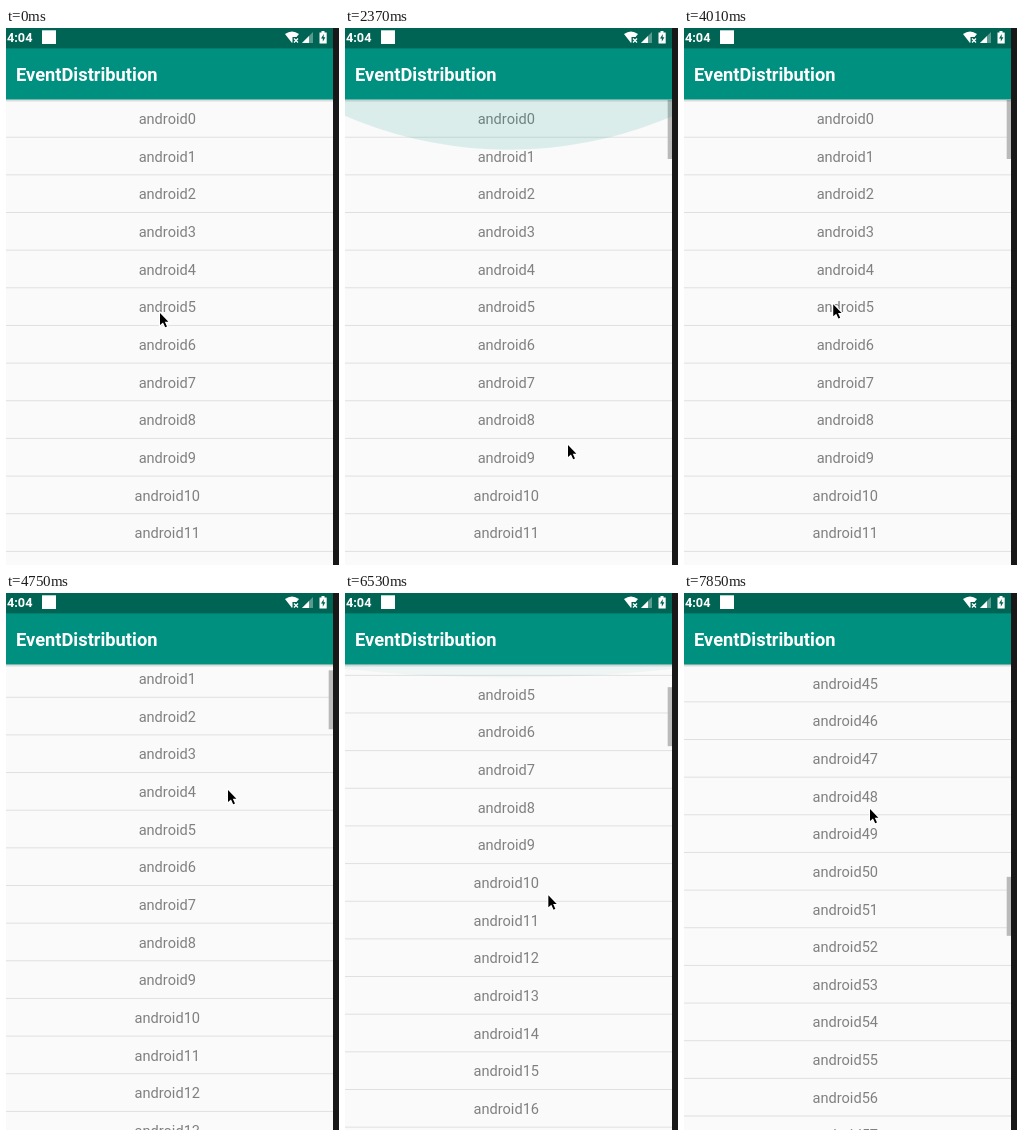
Animation, 333 px wide and 537 px high, one loop 7.99 s. Source, as an HTML page:

```html
<!DOCTYPE html>
<html lang="en">
<head>
<meta charset="utf-8">
<title>EventDistribution</title>
<style>
  html, body { margin: 0; width: 100%; height: 100%; overflow: hidden; background: #fafafa; }
  svg { display: block; width: 333px; height: 537px; font-family: Roboto, sans-serif; }
  .bar-text { fill: #fff; font-weight: 600; }
  #rows text { font-size: 14.6px; fill: #808080; text-anchor: middle; }
  #rows rect { fill: #e0e0e0; }
</style>
</head>
<body>
<svg viewBox="0 0 333 537">
  <defs>
    <clipPath id="view"><rect y="71" width="327" height="466"/></clipPath>
    <linearGradient id="shade" x2="0" y2="1">
      <stop stop-opacity=".18"/>
      <stop offset="1" stop-opacity="0"/>
    </linearGradient>
  </defs>
  <rect width="333" height="537" fill="#fafafa"/>
  <g clip-path="url(#view)">
    <g id="rows"></g>
    <rect id="thumb" x="322.7" width="4.3" height="59" fill="#bababa"/>
    <ellipse id="glow" cx="164" fill="#009080"/>
    <rect y="71.5" width="327" height="3" fill="url(#shade)"/>
  </g>

  <rect width="327" height="71.5" fill="#009080"/>
  <rect width="327" height="20.4" fill="#006454"/>
  <text class="bar-text" x="1" y="14.2" font-size="12.7">4:04</text>
  <text class="bar-text" x="10" y="53" font-size="18.3">EventDistribution</text>
  <g fill="#fff">
    <rect x="36" y="2.3" width="14" height="13.7"/>
    <path d="M279 6Q286 .8 293 6L290.5 9H286.5V14.2L286 15Z"/>
    <path d="M288 10.5L292 14.5M292 10.5L288 14.5" stroke="#fff" stroke-width="1.3"/>
    <path d="M296 15L307 4V15Z" opacity=".35"/>
    <path d="M296 15L303 8V15Z"/>
    <path d="M313.5 4.5H315.5V3H318.5V4.5H320.7V15.5H313.5Z"/>
  </g>
  <path d="M317.8 6L315 10.5H316.8V13.8L319.4 9.2H317.6Z" fill="#006454"/>
  <rect x="327" width="6" height="537" fill="#181818"/>
  <g id="cursor">
    <path d="M1 2V14L4 11.5L6.2 16.3L8 15.5L5.8 10.7H9.4Z"
      stroke="#fff" stroke-width="2" paint-order="stroke"/>
  </g>
</svg>
<script>
  const LOOP = 7990, TICK = 148.1, ROW = 37.65, ROW_COUNT = 100, TOP = 72, WIDTH = 327;
  const byId = id => document.getElementById(id);
  const [rows, glow, thumb, cursor] = ['rows', 'glow', 'thumb', 'cursor'].map(byId);

  // Where the pointer turns: tick, x, y
  const turns = [[0, 153, 283], [7, 150, 411], [11, 223, 322], [16, 222, 415], [23, 97, 330],
                 [32, 221, 195], [39, 200, 406], [48, 204, 226], [53, 185, 214]];
  const pulls = [6, 16, 40];

  const clamp = v => Math.min(1, Math.max(0, v));
  const ease = v => (1 - Math.cos(Math.PI * clamp(v))) / 2;

  function pointerAt(tick) {
    const next = Math.max(1, turns.findIndex(([t]) => t >= tick));
    const [t0, x0, y0] = turns[next - 1], [t1, x1, y1] = turns[next];
    const k = ease((tick - t0) / (t1 - t0));
    return [x0 + (x1 - x0) * k, y0 + (y1 - y0) * k];
  }

  // A short drag up and back, then a long fling down and a smaller one back
  function scrollAt(tick) {
    const drag = 42.6 * clamp(1 - Math.abs(tick - 32) / 3);
    return drag + 1858.5 * ease((tick - 43) / 5) - 163.9 * ease((tick - 48) / 5);
  }

  const pullAt = tick => Math.max(...pulls.map(p => clamp(1.25 - Math.abs(tick - p) / 4)));

  function add(tag, attrs, label = '') {
    const node = document.createElementNS('http://www.w3.org/2000/svg', tag);
    for (const name in attrs) node.setAttribute(name, attrs[name]);
    node.textContent = label;
    rows.append(node);
  }

  for (let i = 0; i < ROW_COUNT; i++) {
    add('text', { x: 161.3, y: 96 + i * ROW }, 'android' + i);
    add('rect', { x: 0, y: 108.7 + i * ROW, width: WIDTH, height: 1 });
  }

  // Overscroll glow: the lower cap of a 60° arc, squashed by the pull
  function drawGlow(pull) {
    const radius = 1.2 * WIDTH, squash = .945 * pull;
    glow.setAttribute('rx', radius);
    glow.setAttribute('ry', radius * squash);
    glow.setAttribute('cy', TOP - radius * Math.cos(Math.PI / 6) * squash);
    glow.setAttribute('opacity', .13 * clamp(pull * 1.5));
  }

  function draw(ms) {
    const tick = Math.floor(ms % LOOP / TICK);
    const scroll = scrollAt(tick);
    rows.setAttribute('transform', `translate(0 ${-scroll})`);
    cursor.setAttribute('transform', `translate(${pointerAt(tick)})`);
    thumb.setAttribute('y', TOP + scroll / 8);
    thumb.setAttribute('opacity', tick < 2 ? 0 : 1);
    drawGlow(pullAt(tick));
  }

  const start = performance.now();
  function play() {
    draw(performance.now() - start);
    requestAnimationFrame(play);
  }
  play();
</script>
</body>
</html>
```
